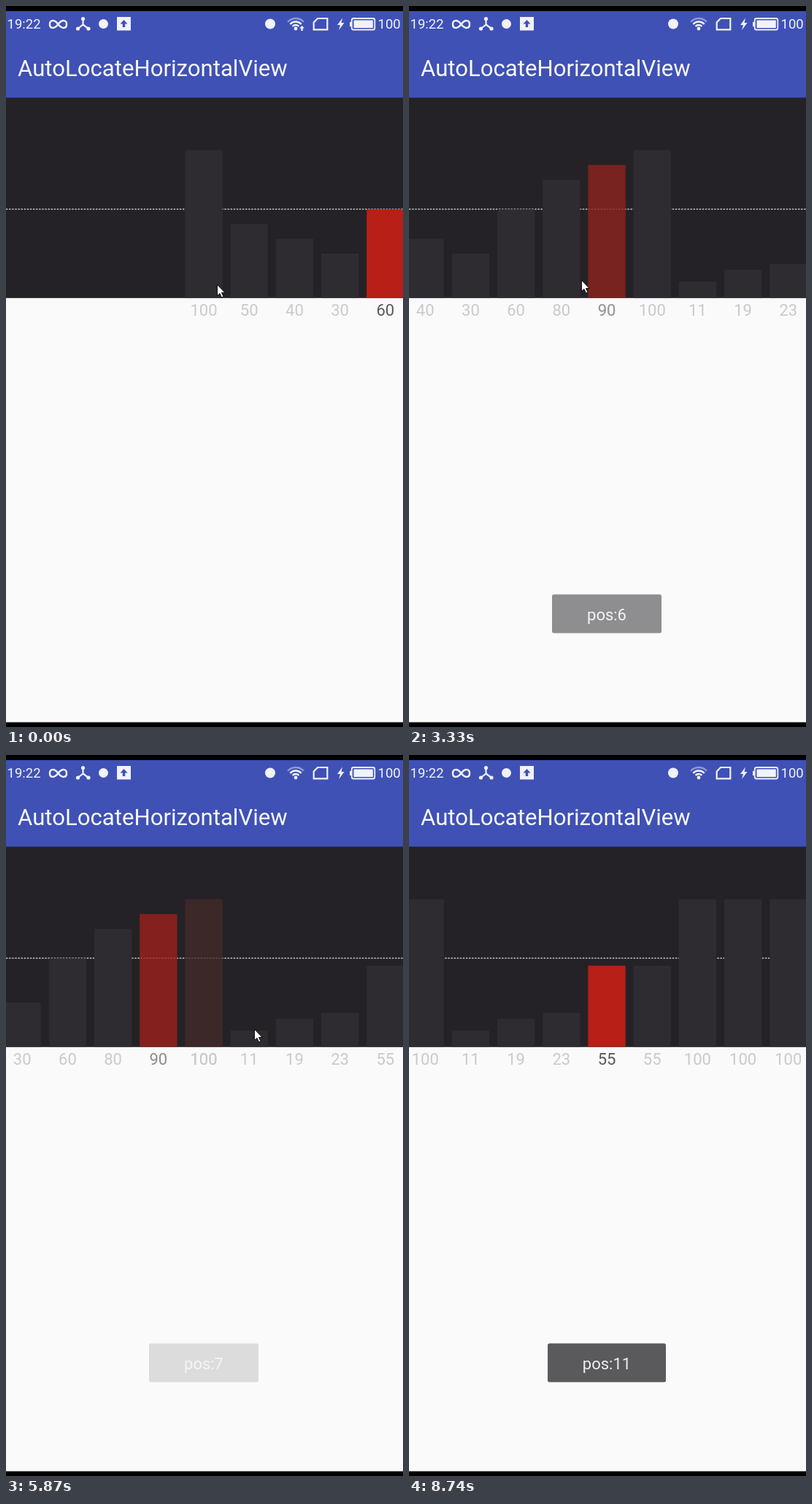
An HTML page with a canvas for the animation above (9050 ms loop, 544 by 987 pixels).

```html
<!DOCTYPE html>
<html lang="en">
<head>
<meta charset="utf-8">
<title>AutoLocateHorizontalView</title>
<style>
  html, body { margin: 0; height: 100%; overflow: hidden; background: #000; }
  canvas { display: block; }
</style>
</head>
<body>
<canvas id="stage" width="544" height="987"></canvas>
<script>
const g = document.getElementById('stage').getContext('2d');
const LOOP = 9050, STEP = 133;
const PITCH = 62.2, MID = 271, BASE = 399.5;
const BLUE = '#3f51b5', DARK = '#242226', PAPER = '#fafafa', ICON = '#f1f2fa';
const values = [100, 50, 40, 30, 60, 80, 90, 100, 11, 19, 23, 55, 55, 100, 100, 100];

// Each pick scrolls its item to the middle, highlights it and shows a toast
const firstItem = 4;
const picks = [
  { at: 80, item: 0 }, { at: 3160, item: 6 }, { at: 5750, item: 7 }, { at: 7720, item: 11 }
];
// Pointer moves: start, duration, destination
const moves = [
  [1250, 600, 412, 368], [1850, 664, 236, 375], [3330, 240, 298, 379], [3860, 660, 350, 404],
  [4800, 300, 340, 375], [6100, 800, 504, 382], [7200, 500, 499, 1109]
];

const clamp = x => Math.max(0, Math.min(1, x));
const easeOut = p => 1 - (1 - p) ** 3;
const easeInOut = p => 0.5 - 0.5 * Math.cos(Math.PI * p);

function rect(x, y, w, h, color) {
  g.fillStyle = color;
  g.fillRect(x, y, w, h);
}

function text(s, x, y, size, color, align = 'left') {
  g.font = size + 'px Roboto, sans-serif';
  g.textAlign = align;
  g.fillStyle = color;
  g.fillText(s, x, y);
}

function stroke(d, width, color = ICON) {
  g.lineWidth = width;
  g.strokeStyle = color;
  g.stroke(new Path2D(d));
}

function fill(d, color = ICON) {
  g.fillStyle = color;
  g.fill(new Path2D(d));
}

function dot(x, y, r) {
  g.fillStyle = ICON;
  g.beginPath();
  g.arc(x, y, r, 0, 7);
  g.fill();
}

function box(x, y, w, h, r) {
  g.beginPath();
  g.roundRect(x, y, w, h, r);
}

function wifi(sending) {
  for (let ring = 1; ring <= 3; ring++) {
    g.strokeStyle = ring === 3 ? '#8e99d3' : ICON;
    g.lineWidth = 2.4;
    g.beginPath();
    g.arc(397, 32, 1.5 + 4.5 * ring, -Math.PI * 0.76, -Math.PI * 0.24);
    g.stroke();
  }
  dot(397, 31, 2.4);
  if (sending) {
    rect(402, 26, 8, 9, BLUE);
    fill('M405.5 27 l3.5 3.5 h-2.3 v3.5 h-2.4 v-3.5 h-2.3z');
  }
}

function statusBar(t) {
  text('19:22', 1.5, 31, 18.5, ICON);
  stroke('M71.5 25 C66 18 60 19 60 25 S66 32 71.5 25 S83 19 83 25 S77 32 71.5 25', 2.5);
  stroke('M105.5 17 V25.5 L98.5 31 M105.5 25.5 L113 31', 2.2);
  dot(105.5, 17.5, 2.6);
  dot(98.5, 31, 2.6);
  dot(113, 31, 2.6);
  dot(133.5, 24.5, 6.5);
  rect(152, 15, 19, 18.5, ICON);
  fill('M161.5 19 l5 5.5 h-3.3 v4.5 h-3.4 v-4.5 h-3.3z', BLUE);
  dot(362, 24.5, 7);
  wifi(t < 1400 || (t > 6400 && t < 8600));
  stroke('M427 17 H440.3 V32.3 H421.7 V22.5 Z', 2.2);
  fill('M461 16.5 L454 26 h4 l-2 7 L463.5 23 h-4z');
  box(473.7, 17, 31.6, 15.5, 2.5);
  g.lineWidth = 1.8;
  g.stroke();
  rect(476.5, 19.5, 26.3, 10.5, ICON);
  rect(471, 22, 2, 6, ICON);
  text('100', 509.5, 31, 18.5, ICON);
}

function item(i, scroll, selected, alpha) {
  const shift = PITCH * (i - scroll), height = 2.02 * values[i];
  g.globalAlpha = alpha;
  rect(245.4 + shift, BASE - height, 51.3, height, selected ? '#b81f17' : '#2e2c30');
  text(values[i], MID + shift, 423.5, 22, selected ? '#5a585a' : '#cacaca', 'center');
  g.globalAlpha = 1;
}

function scrollAt(t) {
  let scroll = 0, from = 0;
  for (const pick of picks) {
    const distance = pick.item - from, duration = 250 + 45 * distance;
    scroll += distance * easeOut(clamp((t - pick.at + 100 + duration) / duration));
    from = pick.item;
  }
  return scroll;
}

function chart(t) {
  rect(0, 125.5, 544, BASE - 125.5, DARK);
  g.setLineDash([2.5, 1.6]);
  stroke('M0 278.2 H544', 1.2, '#dcdcdc');
  g.setLineDash([]);

  let current = firstItem, previous = firstItem, mix = 1;
  for (const pick of picks) {
    if (pick.at > t) break;
    previous = current;
    current = pick.item;
    mix = easeInOut(clamp((t - pick.at) / 250));
  }
  const scroll = scrollAt(t);
  values.forEach((v, i) => {
    const selected = i === current;
    const changing = mix < 1 && (selected || i === previous);
    item(i, scroll, selected, changing ? mix : 1);
    if (changing) item(i, scroll, !selected, 1 - mix);
  });
}

function toast({ at, item }, n, t) {
  const next = picks[n + 1];
  const end = Math.min(at + 2000, next ? next.at : LOOP + 2000);
  const alpha = Math.min(clamp((t - at - 78) / 130), 1 - clamp((t - end) / 180));
  if (!alpha) return;
  const label = 'pos:' + item, w = 90 + 12 * label.length;
  g.globalAlpha = alpha;
  g.fillStyle = '#5a595b';
  box(MID - w / 2, 805.6, w, 53, 2.5);
  g.fill();
  g.globalAlpha = 1;
  // The label fades against the page, not against its box
  text(label, MID, 840.5, 22, alpha < 1 ? '#f4f4f4' : '#eeeeee', 'center');
}

function cursor(t) {
  let x = 289, y = 381;
  for (const [start, duration, toX, toY] of moves) {
    const p = clamp((t - start) / duration);
    x += (toX - x) * p;
    y += (toY - y) * p;
  }
  const arrow = 'M0 0 V15 L3.5 12 L6 17.5 L8.5 16.5 L6 11 H10.5 Z';
  g.save();
  g.translate(Math.round(x) + 0.5, Math.round(y) + 0.5);
  fill(arrow, '#fff');
  stroke(arrow, 1, '#111');
  g.restore();
}

function draw(now) {
  const t = Math.floor((now % LOOP) / STEP) * STEP;
  rect(0, 0, 544, 987, '#000');
  rect(0, 7, 544, 119, BLUE);
  rect(0, BASE, 544, 600, PAPER);
  statusBar(t);
  text('AutoLocateHorizontalView', 16, 95.5, 31.15, PAPER);
  chart(t);
  picks.forEach((pick, n) => toast(pick, n, t));
  cursor(t);
  rect(0, 980.5, 544, 7, '#000');
}

const begin = performance.now();
function tick() {
  draw(performance.now() - begin);
  requestAnimationFrame(tick);
}
tick();
</script>
</body>
</html>
```
